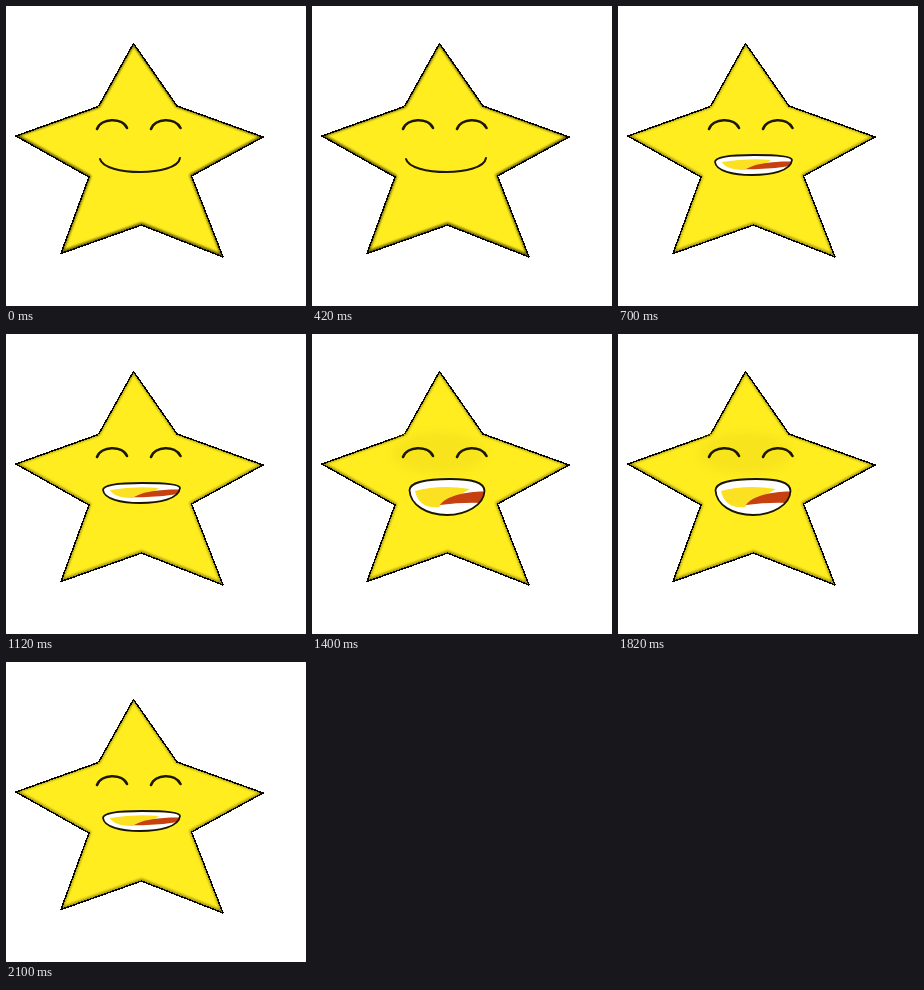
Animation of 300 by 300 pixels, one loop 2.8 s. Source, as an HTML page:

```html
<!DOCTYPE html>
<html lang="en">
<head>
<meta charset="utf-8">
<title>Laughing star</title>
<style>
  html, body { margin: 0; width: 100%; height: 100%; overflow: hidden; background: #fff; }
  svg { display: block; width: 100vw; height: 100vh; }
</style>
</head>
<body>
<svg viewBox="0 0 300 300" fill="none" stroke-linecap="round" stroke-linejoin="round">
  <defs>
    <path id="star" d="M127.500 37.500L171 100L257 131L185.500 170L217 251L135.500 219L55 247.500L83 171L10 130L92.500 100.500Z"/>
    <path id="half" d="M97 156C97 151 113 149 136 149C158 149 174 150 174 154C173 165 153 169 134 169C115 169 98 165 97 156Z"/>
    <path id="wide" d="M97.500 156C98 149 113 145 138 145C160 145 172.500 148 172.500 157C172 171 154 181 135 181C115 181 98 171 97.500 156Z"/>
    <clipPath id="inside"><use href="#star"/></clipPath>
    <clipPath id="in-half"><use href="#half"/></clipPath>
    <clipPath id="in-wide"><use href="#wide"/></clipPath>
    <filter id="soft" x="-10%" y="-10%" width="120%" height="120%"><feGaussianBlur stdDeviation="1.2"/></filter>
    <filter id="haze" x="-30%" y="-30%" width="160%" height="160%"><feGaussianBlur stdDeviation="5"/></filter>
  </defs>

  <use href="#star" fill="#ffed20" shape-rendering="crispEdges"/>
  <g clip-path="url(#inside)">
    <use id="shade" href="#star" y="-0.6" stroke="#4c4300" stroke-width="4" filter="url(#soft)"/>
  </g>
  <use href="#star" stroke="#080700" stroke-width="1.5" shape-rendering="crispEdges"/>

  <g class="mouth" stroke="#1c1800" stroke-width="2">
    <path d="M94 153C98 170 171 171 174 152"/>
  </g>

  <g class="mouth">
    <use href="#half" fill="#fff"/>
    <g clip-path="url(#in-half)">
      <path d="M104 156Q128 152 153 154Q148 159 128 164Q108 164 104 156Z" fill="#fbe122"/>
      <path d="M128 163C138 157 158 155 175 155.500L172 160Q150 164 128 163Z" fill="#c7400f"/>
    </g>
    <use href="#half" stroke="#181500" stroke-width="1.8"/>
  </g>

  <g class="mouth">
    <ellipse cx="127" cy="119" rx="47" ry="21" fill="#f8e41c" filter="url(#haze)"/>
    <use href="#wide" fill="#fff"/>
    <g clip-path="url(#in-wide)">
      <path d="M103 157Q128 150 158 155Q150 160 137 165Q131 168 127 173Q107 175 103 157Z" fill="#fbe122"/>
      <path d="M128 171C134 162 154 157 175 157.500L172 169Q150 168 128 171Z" fill="#c7400f"/>
    </g>
    <use href="#wide" stroke="#181500" stroke-width="1.8"/>
  </g>

  <g stroke="#1c1800" stroke-width="2.6">
    <path d="M91 123C95 112 116 111 121 122"/>
    <path d="M145 123C149 112 169 111 174.500 122"/>
  </g>
</svg>
<script>
  const STEP = 700;
  const SEQUENCE = [0, 1, 2, 1]; // smile, half open, wide open, half open
  const mouths = document.querySelectorAll(".mouth");
  const shade = document.getElementById("shade");

  function draw() {
    const pose = SEQUENCE[Math.floor(performance.now() / STEP) % SEQUENCE.length];
    mouths.forEach((mouth, i) => { mouth.style.display = i === pose ? "" : "none"; });
    shade.setAttribute("opacity", pose === 0 ? 0.8 : 0.5);
    requestAnimationFrame(draw);
  }
  draw();
</script>
</body>
</html>
```
